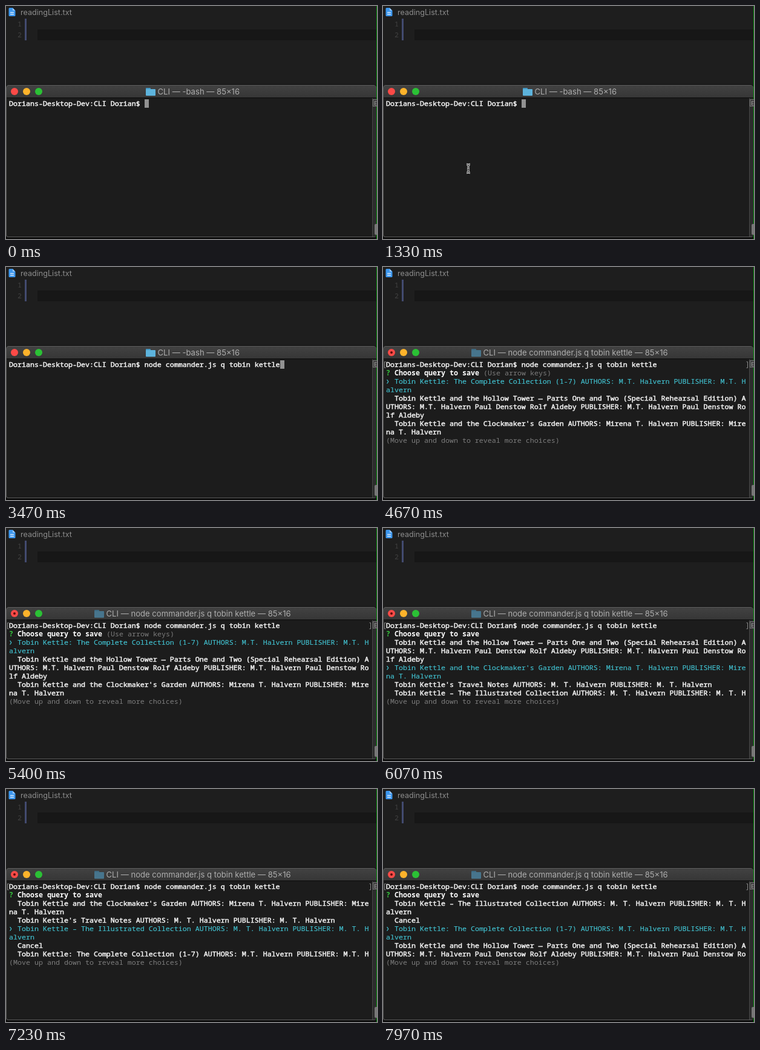
Recreate the animation shown at these times as an HTML page with a canvas. Size 613 px wide and 387 px high, loop 8 s.

```html
<!DOCTYPE html>
<html lang="en">
<head>
<meta charset="utf-8">
<title>Reading list CLI</title>
<style>
  html, body { margin: 0; width: 100%; height: 100%; overflow: hidden; background: #1e1e1e; }
  canvas { display: block; }
</style>
</head>
<body>
<canvas id="stage" width="613" height="387"></canvas>
<script>
const ctx = document.getElementById('stage').getContext('2d');
const LOOP = 8000, COLS = 85, CELL = 7, ROW = 14, PAGE = 7;
const MONO = '11.667px "Noto Sans Mono", "Liberation Mono", monospace';
const SANS = 'Inter, "Liberation Sans", sans-serif';
const WHITE = '#f4f4f4', CYAN = '#42c3d2', GREY = '#7d7d7d', GREEN = '#35c23c';

const PROMPT = 'Dorians-Desktop-Dev:CLI Dorian$ ';
const COMMAND = 'node commander.js q tobin kettle';
const CHOICES = [
  'Tobin Kettle: The Complete Collection (1-7) AUTHORS: M.T. Halvern PUBLISHER: M.T. Halvern',
  'Tobin Kettle and the Hollow Tower — Parts One and Two (Special Rehearsal Edition) AUTHORS: M.T. Halvern Paul Denstow Rolf Aldeby PUBLISHER: M.T. Halvern Paul Denstow Rolf Aldeby',
  "Tobin Kettle and the Clockmaker's Garden AUTHORS: Mirena T. Halvern PUBLISHER: Mirena T. Halvern",
  "Tobin Kettle's Travel Notes AUTHORS: M. T. Halvern PUBLISHER: M. T. Halvern",
  'Tobin Kettle – The Illustrated Collection AUTHORS: M. T. Halvern PUBLISHER: M. T. Halvern',
  'Cancel'
];

// Every choice is wrapped at the terminal width; the page is a window over these lines.
const lines = CHOICES.flatMap((choice, item) =>
  ('  ' + choice).match(new RegExp(`.{1,${COLS}}`, 'g')).map((text, part) => ({ text, item, first: part === 0 })));

const TYPE_START = 2000, TYPE_FAST = 2530, ENTER = 3750, LIST = 4650;
const KEY_DOWN = [5620, 5950, 6450, 6950, 7400, 7780];
const MOUSE_IN = 150, MOUSE_REST = 800;

function rect(color, x, y, w, h, radius = 0) {
  ctx.fillStyle = color;
  ctx.beginPath();
  ctx.roundRect(x, y, w, h, radius);
  ctx.fill();
}

function dot(color, x, y, r) {
  ctx.fillStyle = color;
  ctx.beginPath();
  ctx.arc(x, y, r, 0, Math.PI * 2);
  ctx.fill();
}

function polygon(color, ...points) {
  ctx.fillStyle = color;
  ctx.beginPath();
  points.forEach(([x, y]) => ctx.lineTo(x, y));
  ctx.fill();
}

function label(text, x, y, color, font) {
  ctx.font = font;
  ctx.fillStyle = color;
  ctx.fillText(text, x, y);
}

// A thin outline gives the terminal's medium weight, between regular and bold.
function print(text, col, row, color, { weight = 400, outline = 0 } = {}) {
  const x = 5 + col * CELL, y = 166 + row * ROW;
  label(text, x, y, color, `${weight} ${MONO}`);
  if (!outline) return;
  ctx.strokeStyle = color;
  ctx.lineWidth = outline;
  ctx.strokeText(text, x, y);
}

const MEDIUM = { outline: 0.5 }, LIGHT = { outline: 0.15 }, BOLD = { weight: 700 };

function block(col, row) {
  rect('#929292', 5 + col * CELL, 155 + row * ROW, CELL, ROW);
}

function drawEditor() {
  rect('#1e1e1e', 0, 0, 613, 387);
  rect('#3d97ee', 4.5, 3, 11, 14, [1.5, 0, 1.5, 1.5]);
  polygon('#1e1e1e', [11, 3], [16, 3], [16, 8]);
  polygon('#a9d0f6', [11, 3.5], [11, 7.5], [15, 7.5]);
  rect('#e4effa', 7, 10, 6, 1.3);
  rect('#e4effa', 7, 13, 6, 1.3);
  label('readingList.txt', 24, 15, '#8c8c8c', `12.6px ${SANS}`);
  rect('#171717', 52, 39, 560, 18);
  for (const n of [1, 2]) label(n, 19, 16 + n * 18, '#424242', `400 ${MONO}`);
  rect('#434b70', 31, 21, 3, 36);
}

function drawWindow(running) {
  rect('#0c0c0c', 0, 130, 613, 257, [6, 6, 0, 0]);
  rect('#5b5b5b', 0, 131, 612, 253, [5, 5, 4, 4]);
  const bar = ctx.createLinearGradient(0, 132, 0, 152);
  bar.addColorStop(0, '#424242');
  bar.addColorStop(1, '#363636');
  rect(bar, 1, 132, 611, 20, [4, 4, 0, 0]);
  rect('#0a0a0a', 1, 152, 611, 1);
  rect('#1c1c1c', 1, 153, 611, 230, [0, 0, 3, 3]);

  ['#fc4a47', '#fdb32b', '#2bc135'].forEach((color, i) => dot(color, 14 + i * 20, 142, 6));
  if (running) dot('#5c0b0a', 14, 142, 2);

  const x = running ? 146 : 231;
  rect(running ? '#3d6a83' : '#4298c4', x, 136, 8, 5, 1);
  rect(running ? '#47758d' : '#5db3dc', x, 138, 16, 11, 1);
  label(`CLI — ${running ? COMMAND : '-bash'} — 85×16`, x + 19.5, 147, '#aeaeae', `13.1px ${SANS}`);

  rect('#2c2c2c', 605, 153, 7, 230);
  rect('#484848', 605, 153, 1, 230);
  rect('#0b930f', 612, 0, 1, 387);
  rect('#747474', 606, 155, 7, 12);
  rect('#3a3a3a', 607, 156, 6, 10);
  label('E', 608, 165, '#a8a8a8', `9px ${SANS}`);
  rect('#777777', 609, 362, 6, 18, 2);
}

function drawBrackets() {
  ctx.strokeStyle = '#8a8a8a';
  ctx.lineWidth = 1;
  ctx.stroke(new Path2D('M4.5 157.5H2.5V167.5H4.5M600.5 157.5H602.5V167.5H600.5'));
}

function drawChoices(presses) {
  print('?', 0, 1, GREEN, BOLD);
  print('Choose query to save', 2, 1, '#ffffff', BOLD);
  if (!presses) print('(Use arrow keys)', 23, 1, GREY);

  const selected = presses % CHOICES.length;
  const active = lines.findIndex(line => line.item === selected);
  const top = active - (presses < 2 ? active : 3) + lines.length;
  for (let i = 0; i < PAGE; i++) {
    const { text, item, first } = lines[(top + i) % lines.length];
    const chosen = item === selected;
    if (chosen && first) label('❯', 5, 165 + (2 + i) * ROW, CYAN, '9px "DejaVu Sans Mono", monospace');
    const indent = first ? 2 : 0;
    print(text.slice(indent), indent, 2 + i, chosen ? CYAN : WHITE, chosen ? LIGHT : MEDIUM);
  }
  print('(Move up and down to reveal more choices)', 0, 2 + PAGE, GREY);
}

function typedCount(t) {
  if (t < TYPE_START) return 0;
  if (t < TYPE_FAST) return Math.min(5, 1 + Math.floor((t - TYPE_START) / 110));
  return Math.min(COMMAND.length, 6 + Math.floor((t - TYPE_FAST) / 29));
}

function drawMouse(t) {
  if (t < MOUSE_IN || t >= TYPE_START) return;
  const p = Math.min(1, (t - MOUSE_IN) / (MOUSE_REST - MOUSE_IN));
  const rest = (1 - p) ** 3;
  ctx.save();
  ctx.translate(141 + 472 * rest, 270 + 102 * rest);
  const beam = new Path2D('M-3 -7Q0 -7 0 -5Q0 -7 3 -7M0 -5V5M-3 7Q0 7 0 5Q0 7 3 7M-2 2H2');
  for (const [color, width] of [['#f0f0f0', 3], ['#111111', 1]]) {
    ctx.strokeStyle = color;
    ctx.lineWidth = width;
    ctx.stroke(beam);
  }
  ctx.restore();
}

function draw(t) {
  const running = t >= ENTER;
  const typed = COMMAND.slice(0, typedCount(t));
  drawEditor();
  drawWindow(running);
  print(PROMPT + typed, 0, 0, WHITE, MEDIUM);
  if (running) drawBrackets();
  if (t >= LIST) drawChoices(KEY_DOWN.filter(time => t >= time).length);
  else if (running) block(0, 1);
  else block(PROMPT.length + typed.length, 0);
  drawMouse(t);
}

const start = performance.now();
function tick() {
  draw((performance.now() - start) % LOOP);
  requestAnimationFrame(tick);
}
tick();
</script>
</body>
</html>
```
